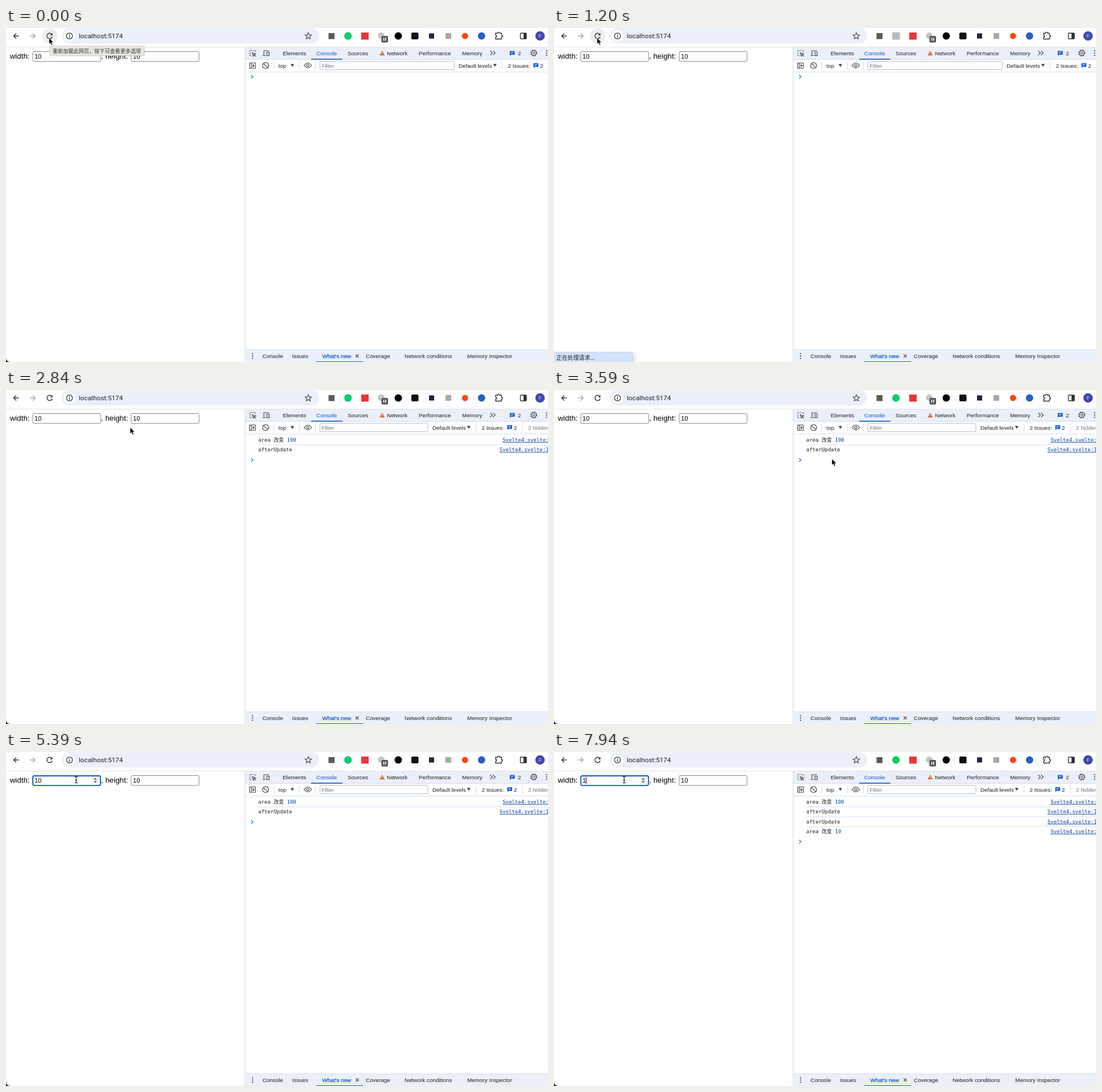
Write an HTML page that moves like this. It is 952x588 px and loops after 8 s.

```html
<!DOCTYPE html>
<html lang="zh">
<head>
<meta charset="utf-8">
<title>Console logging</title>
<style>
  html, body { margin: 0; width: 100%; height: 100%; overflow: hidden; background: #fff; }
  svg { display: block; width: 100%; height: 100%; }
  text { font-family: "Liberation Sans", Arial, sans-serif; font-size: 9.9px; fill: #1f1f1f; white-space: pre; }
  .bar { font-size: 9.75px; }
  .page { font-size: 13.33px; fill: #000; }
  .field { font-size: 11.1px; fill: #000; }
  .mono { font-family: "DejaVu Sans Mono", "Noto Sans CJK SC", monospace; font-size: 9px; }
  .cjk { font-family: "Noto Sans CJK SC", "Noto Sans CJK", sans-serif; }
  .icon { fill: none; stroke: #454746; stroke-width: 1.2; }
  .blue { fill: #0b57d0; }
  .link { fill: #0842a0; text-decoration: underline; }
</style>
</head>
<body>
<svg id="stage" viewBox="0 0 952 588" xmlns="http://www.w3.org/2000/svg"></svg>
<script>
const LOOP = 8000, STEP = 150;
const TINT = '#ebeff9', LINE = '#d3e0f5';

const rect = (x, y, w, h, fill, extra = '') =>
  `<rect x="${x}" y="${y}" width="${w}" height="${h}" fill="${fill}" ${extra}/>`;
const disc = (x, y, r, fill, extra = '') =>
  `<circle cx="${x}" cy="${y}" r="${r}" fill="${fill}" ${extra}/>`;
const text = (x, y, s, cls = '', extra = '') => `<text x="${x}" y="${y}" class="${cls}" ${extra}>${s}</text>`;
const icon = (d, extra = '') => `<path class="icon" d="${d}" ${extra}/>`;
const shape = (d, fill, extra = '') => `<path d="${d}" fill="${fill}" ${extra}/>`;
const group = (id, body, extra = '') => `<g id="${id}" ${extra}>${body}</g>`;
const dots = (x, y) => [-4, 0, 4].map(d => disc(x, y + d, 1.1, '#303030')).join('');
const sep = x => rect(x, 59, 1, 14, '#cfdaee');
const down = (x, y) => shape(`M${x} ${y}h6.4l-3.2 5z`, '#454746');
const chat = (x, y) => shape(`M${x} ${y}h8.5v6.5h-6.5l-2 2z`, '#0b57d0') +
  `<path d="M${x + 2} ${y + 2.2}h4.6m-4.6 2h3" stroke="#fff" stroke-width=".9"/>`;

function browserBar() {
  const star = Array.from({ length: 10 }, (_, i) => {
    const r = i % 2 ? 2.7 : 6, a = i * Math.PI / 5;
    return `${(531 + r * Math.sin(a)).toFixed(2)} ${(14.2 - r * Math.cos(a)).toFixed(2)}`;
  });
  return rect(0, 0, 952, 33, '#fff') + rect(0, 33, 952, 1, '#e1e3e8') +
    icon('M22.5 14H13.5M18 9.5L13.5 14L18 18.5', 'style="stroke:#303134;stroke-width:1.4"') +
    icon('M42.2 14H51.2M46.8 9.5L51.3 14L46.8 18.5', 'style="stroke:#a5a7aa;stroke-width:1.3"') +
    group('hover', disc(76.5, 14, 13.7, '#eeeef0')) +
    icon('M80.5 11.2A4.7 4.7 0 1 0 81.2 15.2', 'style="stroke:#303134;stroke-width:1.4"') +
    shape('M81.6 9V13.1H77.5z', '#303134') +
    rect(98, .3, 452, 27, TINT, 'rx="13.5"') + disc(111.5, 14, 10, '#fff') +
    disc(111.5, 14, 5.2, 'none', 'stroke="#303134" stroke-width="1.3"') +
    rect(110.8, 13.2, 1.4, 3.8, '#303134') + rect(110.8, 10.8, 1.4, 1.4, '#303134') +
    text(128, 18, 'localhost:5174', '', 'style="font:11.75px Roboto,sans-serif"') +
    icon(`M${star.join('L')}z`) + extensions();
}

function extensions() {
  return rect(566.5, 9, 10.5, 10.5, '#5a5a5a') +
    group('badge', disc(600.7, 14, 6.7, '#0ccf6a')) +
    group('badgeOff', rect(594, 7.5, 13.5, 13, '#b9babb')) +
    rect(624, 8, 13, 12.5, '#e8363b') +
    disc(659, 13.5, 5.8, '#c4c4c4') + rect(659.5, 14, 11.5, 11.5, '#555', 'rx="2"') +
    rect(662.8, 17, 1.6, 5.5, '#fff') + rect(666, 17, 1.6, 5.5, '#fff') +
    disc(689, 14, 6.5, '#000') + rect(712, 8, 12.5, 12, '#111', 'rx="2"') +
    rect(743, 9.5, 9, 9, '#20233c') + rect(772, 9, 10, 10, '#a8a8a8') +
    disc(806.3, 14, 5.5, '#ff4716') + disc(835.3, 14, 6.4, '#285fc4') +
    icon('M860 9.3h3.4a1.9 1.9 0 0 1 3.8 0h3v3.4a1.9 1.9 0 0 1 0 3.8v3h-10.2v-3.2a1.8 1.8 0 0 0 0-3.6z',
      'style="stroke:#303134;stroke-width:1.4"') +
    rect(903.5, 9, 10.5, 10, 'none', 'stroke="#303134" stroke-width="1.4" rx="1"') +
    rect(909, 9, 5, 10, '#303134') +
    disc(938, 14, 8.3, '#4148ab') + text(938, 17, 'F', '', 'text-anchor="middle" style="font-size:8.5px;fill:#d4d6f0"');
}

function page() {
  const field = x => rect(x, 41.5, 119.3, 17.4, '#fff', 'rx="2.3" stroke="#767676" stroke-width=".9"');
  return text(6.7, 54, 'width:', 'page') + group('field', field(47)) +
    group('spinner', rect(152, 44, 9.5, 12, '#efefef') +
      shape('M154.2 48.8h5.2l-2.6-3.4z', '#5a5a5a') + shape('M154.2 51.2h5.2l-2.6 3.4z', '#5a5a5a')) +
    group('focus', rect(47.2, 42, 118.6, 16.8, 'none', 'rx="2.2" stroke="#0f59cc" stroke-width="1.8"')) +
    text(50, 54, '10', 'field', 'id="width"') + rect(62, 44, 1, 12, '#000', 'id="caret"') +
    text(167, 54, ', height:', 'page') + field(219.8) + text(223, 54, '10', 'field') +
    shape('M0 580Q0 588 8 588H0z', '#000');
}

function tabs() {
  const labels = [[486, 'Elements'], [600, 'Sources'], [669, 'Network'], [725, 'Performance'], [801, 'Memory'], [899, '2']];
  return rect(420, 34, 532, 21, TINT) + rect(420, 55, 532, 1, LINE) +
    icon('M438 42V39.5H428.5V49H431', 'stroke-dasharray="1.6 1.2"') +
    icon('M432.5 43.5L438.5 45.5L435.6 46.7L434.4 49.6zM435.5 46.5L439 50') +
    icon('M453 47.5V40H462M450.5 48.5H456.5') + icon('M458.3 42.5H462.2V48.7H458.3z') +
    labels.map(([x, s]) => text(x, 47.8, s)).join('') +
    text(545, 47.8, 'Console', 'blue') + rect(536, 54, 55, 1.6, '#0b57d0') +
    shape('M656.2 48.2L660.8 40L665.4 48.2z', '#e4672b') + rect(660.3, 43, 1, 2.6, '#fff') +
    icon('M850.5 40.2L854.3 44L850.5 47.8M855.5 40.2L859.3 44L855.5 47.8') +
    chat(885, 40.5) +
    disc(927, 44, 4.3, 'none', 'stroke="#454746" stroke-width="1.2"') +
    disc(927, 44, 5.3, 'none', 'stroke="#454746" stroke-width="1.4" stroke-dasharray="2.1 2.06"') +
    disc(927, 44, 1.7, 'none', 'stroke="#454746"') + dots(949.5, 44);
}

function toolbar() {
  return rect(420, 56, 532, 21, '#fff') + rect(420, 77, 532, 1, LINE) +
    icon('M428 61.5h10v9.5h-10zM431.2 61.5v9.5M434 64.5v3.6l2-1.8z') +
    disc(456, 66.2, 5.3, 'none', 'stroke="#454746" stroke-width="1.2"') + icon('M452.3 62.5L459.7 69.9') +
    sep(470) + text(478.5, 69.5, 'top', 'bar') + down(499.8, 63.5) + sep(514.5) +
    icon('M523.5 66Q530 57.5 536.7 66Q530 74.5 523.5 66z') + disc(530.1, 66, 2, 'none', 'stroke="#454746" stroke-width="1.2"') +
    sep(543) + rect(551.5, 58.8, 236, 14.5, '#fff', 'id="filter" rx="2" stroke="#b4bccb"') +
    text(554.5, 69.7, 'Filter', 'bar', 'style="fill:#757575"') +
    group('levels', text(795, 69.5, 'Default levels', 'bar') + down(855.6, 63.3) + sep(871) +
      text(881.5, 69.5, '2 Issues:', 'bar') + chat(926.5, 62) + text(938, 69.5, '2', 'bar')) +
    group('hidden', sep(906.5) + text(917, 69.5, '2 hidden', 'bar', 'style="fill:#757575"'));
}

function logRow(id, i, msg, ref) {
  const y = 90.9 + i * 17.35;
  return group(id, (i ? rect(443, 96.2 + (i - 1) * 17.35, 509, 1, LINE) : '') +
    text(443, y, msg, 'mono') + text(ref.endsWith('1') ? 866.8 : 872.2, y, ref, 'mono link'));
}

function consolePane() {
  const area = n => `area 改变 <tspan fill="#0842a0">${n}</tspan>`;
  const a = 'Svelte4.svelte:', b = a + '1';
  return rect(420, 78, 532, 489, '#fff') +
    group('first', logRow('r0', 0, area(100), a) + logRow('r1', 1, 'afterUpdate', b)) +
    group('second', logRow('r2', 2, 'afterUpdate', b) + logRow('r3', 3, area(10), a)) +
    icon('M430.6 82.7L433.8 85.8L430.6 88.9', 'id="prompt" style="stroke:#1a67e0"') +
    rect(419.5, 34, 1, 554, '#cbd5e6');
}

function drawer() {
  const labels = [[450.5, 'Console'], [502.5, 'Issues'], [632, 'Coverage'], [700, 'Network conditions'], [810, 'Memory Inspector']];
  return rect(420, 566.5, 532, 21.5, TINT) + rect(420, 566, 532, 1, LINE) + dots(433, 577.5) +
    labels.map(([x, s]) => text(x, 581.2, s)).join('') +
    text(555.5, 581.2, "What's new", 'blue', 'stroke="#0b57d0" stroke-width=".25"') +
    icon('M614.2 574.6L619.6 580M619.6 574.6L614.2 580') + rect(545, 587, 82, 1, '#0b57d0');
}

function overlays() {
  return group('tooltip', rect(76, 32, 168, 18, '#000', 'rx="3" opacity=".1"') +
      rect(76.5, 31.5, 166.5, 17, '#e7e5e1', 'rx="1.5" stroke="#d2d0cc" stroke-width=".6"') +
      text(82, 43.6, '重新加载此网页，按下可查看更多选项', 'cjk', 'style="font-size:9.13px;fill:#333"')) +
    group('status', rect(-4, 569, 149, 24, '#000', 'rx="6" opacity=".06"') +
      rect(-4, 571.5, 142.3, 22, '#d3e3fd', 'rx="3" stroke="#bac7de" stroke-width=".8"') +
      text(4, 584, '正在处理请求...', 'cjk', 'style="font-size:9.9px"')) +
    group('arrow', shape('M0 0V11.6L2.6 9.2L4.5 13.4L6.5 12.5L4.7 8.4H8.2z', '#000', 'stroke="#fff" stroke-width=".8"')) +
    group('beam', icon('M120.6 43.2Q123.2 43.2 123.2 45V53Q123.2 54.8 120.6 54.8M125.8 43.2Q123.2 43.2 123.2 45M123.2 53Q123.2 54.8 125.8 54.8M121.6 49.5H124.8',
      'style="stroke:#000;stroke-width:1"'));
}

const stage = document.getElementById('stage');
stage.innerHTML = rect(0, 0, 952, 588, '#fff') + page() + browserBar() + tabs() + toolbar() +
  consolePane() + drawer() + overlays();

const el = Object.fromEntries([...stage.querySelectorAll('[id]')].map(n => [n.id, n]));
const show = (id, on) => el[id].setAttribute('opacity', Number(on));
const move = (id, x, y) => el[id].setAttribute('transform', `translate(${x} ${y})`);

// Pointer stops, one per screen refresh from 2840 ms on
const PATH = [[218, 65.5], [330, 100], [421, 121], [476, 129], [495, 128], [488, 121], [467, 113],
  [440, 110], [401, 109], [354, 110.5], [290, 103], [214, 83], [150, 61]];

function pointer(t) {
  if (t < 2840) return [75.5, 17];
  return PATH[Math.min(Math.floor((t - 2840) / STEP), PATH.length - 1)];
}

function statusOpacity(t) {
  if (t < 1050 || t >= 1640) return 0;
  return t < 1340 ? 1 : t < 1490 ? .8 : .42;
}

function render(t) {
  const logged = t >= 1340, typed = t >= 5990, over = t >= 4790, focused = t >= 4940;
  const blinks = [4940, 5390, 5840, 6440, 6890, 7490, 7940].filter(b => t >= b).length;

  show('tooltip', t < 750 ? 1 : t < 900 ? .4 : 0);
  show('status', statusOpacity(t));
  show('hover', t < 2840);
  const off = t >= 1050 && t < 1340;
  show('badge', !off);
  show('badgeOff', off);

  show('first', logged);
  show('second', typed);
  show('hidden', logged);
  move('levels', logged ? -46 : 0, 0);
  el.filter.setAttribute('width', logged ? 189.5 : 236);
  move('prompt', 0, typed ? 72 : logged ? 37.5 : 0);

  show('spinner', over);
  show('focus', focused);
  show('caret', blinks % 2);
  el.caret.setAttribute('x', typed ? 55.8 : 62);
  el.width.textContent = typed ? '1' : '10';

  show('arrow', !over);
  show('beam', over);
  move('arrow', ...pointer(t));
}

function tick() {
  render(performance.now() % LOOP);
  requestAnimationFrame(tick);
}
tick();
</script>
</body>
</html>
```
